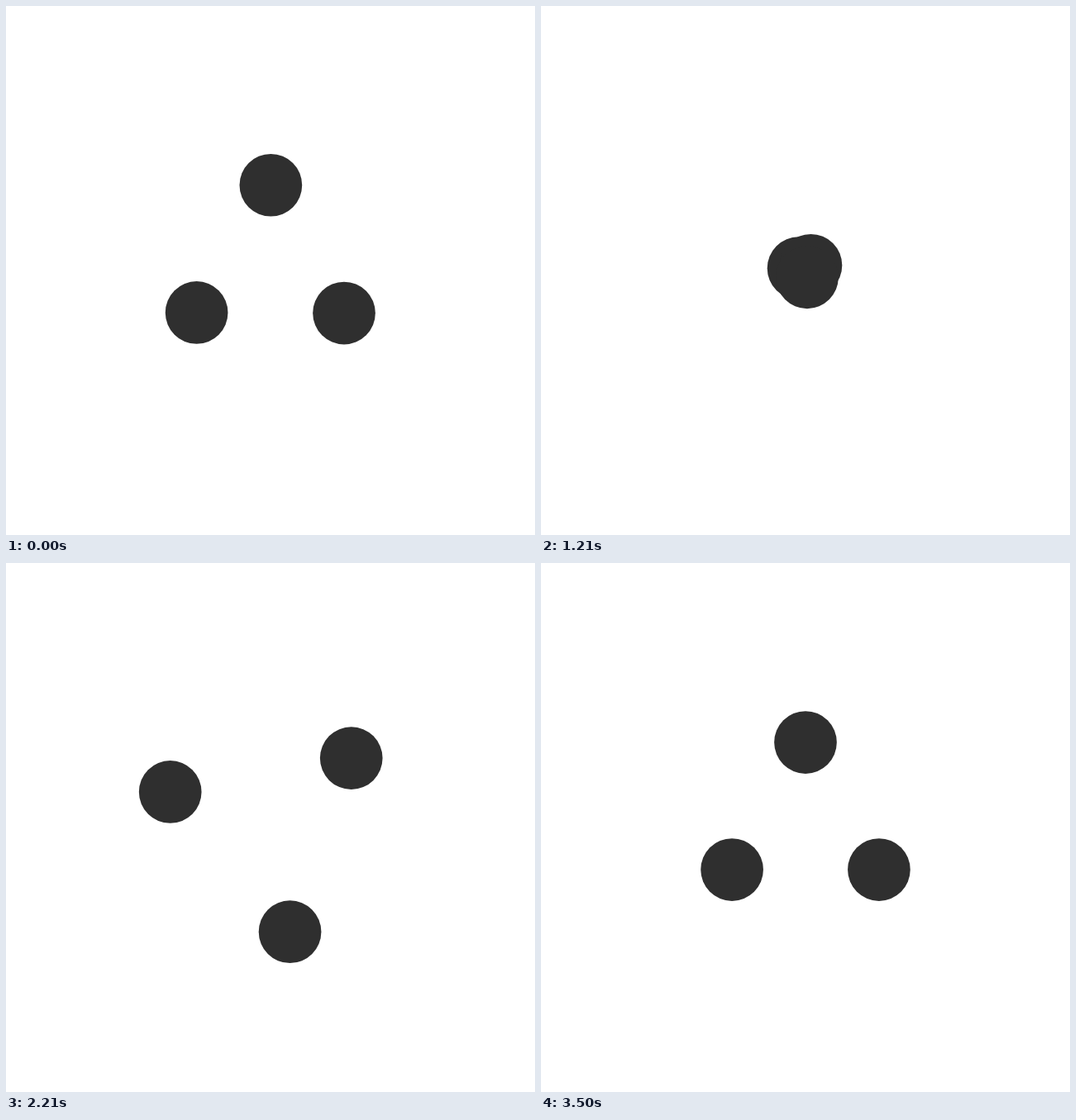
Write an HTML page with a canvas that moves like this. It is 640 px wide and 640 px high and loops after 3570 ms.

```html
<!DOCTYPE html>
<html lang="en">
<head>
<meta charset="utf-8">
<title>Three dots</title>
<style>
  html, body { margin: 0; width: 100%; height: 100%; overflow: hidden; background: #fff; }
  canvas { display: block; width: 640px; height: 640px; }
</style>
</head>
<body>
<canvas id="stage" width="640" height="640"></canvas>
<script>
const ctx = document.getElementById('stage').getContext('2d');
const LOOP = 3570, STEPS = 50;
const CX = 320, CY = 319.75, DOT = 37.85, REACH = 103, START = -89.8;
const MEET = 0.436; // share of the loop at which the dots meet

// Timing curve with the same meaning as CSS cubic-bezier().
function bezier(x1, y1, x2, y2) {
  const at = (s, a, b) => 3 * s * (1 - s) ** 2 * a + 3 * s * s * (1 - s) * b + s ** 3;
  return x => {
    let lo = 0, hi = 1;
    for (let i = 0; i < 30; i++) {
      const mid = (lo + hi) / 2;
      if (at(mid, x1, x2) < x) lo = mid; else hi = mid;
    }
    return at((lo + hi) / 2, y1, y2);
  };
}

const pullIn = bezier(0.47, -1.55, 0.11, 0.9);
const pushOut = bezier(0.26, 2.22, 0.095, 0.9);
const cruise = bezier(0.33, 0.27, 0.67, 0.73);
const slowDown = bezier(0.13, 0.45, 0.55, 1);

// Swing out and meet in one full turn, then cross over and settle in half a turn.
function pose(p) {
  if (p < MEET) {
    const u = p / MEET;
    return { r: REACH * (1 - pullIn(u)), turn: 360 * cruise(u) };
  }
  const u = (p - MEET) / (1 - MEET);
  return { r: -REACH * pushOut(u), turn: 360 + 180 * slowDown(u) };
}

function draw(p) {
  const { r, turn } = pose(p);
  ctx.fillStyle = '#fff';
  ctx.fillRect(0, 0, 640, 640);
  ctx.fillStyle = '#2f2f2f';
  for (let i = 0; i < 3; i++) {
    const a = (START + turn + i * 120) * Math.PI / 180;
    ctx.beginPath();
    ctx.arc(CX + r * Math.cos(a), CY + r * Math.sin(a), DOT, 0, Math.PI * 2);
    ctx.fill();
  }
}

const start = performance.now();
function tick() {
  const t = (performance.now() - start) % LOOP;
  // The motion advances in even steps; 5 ms covers rounded step times.
  draw(Math.floor((t + 5) * STEPS / LOOP) % STEPS / STEPS);
  requestAnimationFrame(tick);
}
tick();
</script>
</body>
</html>
```
